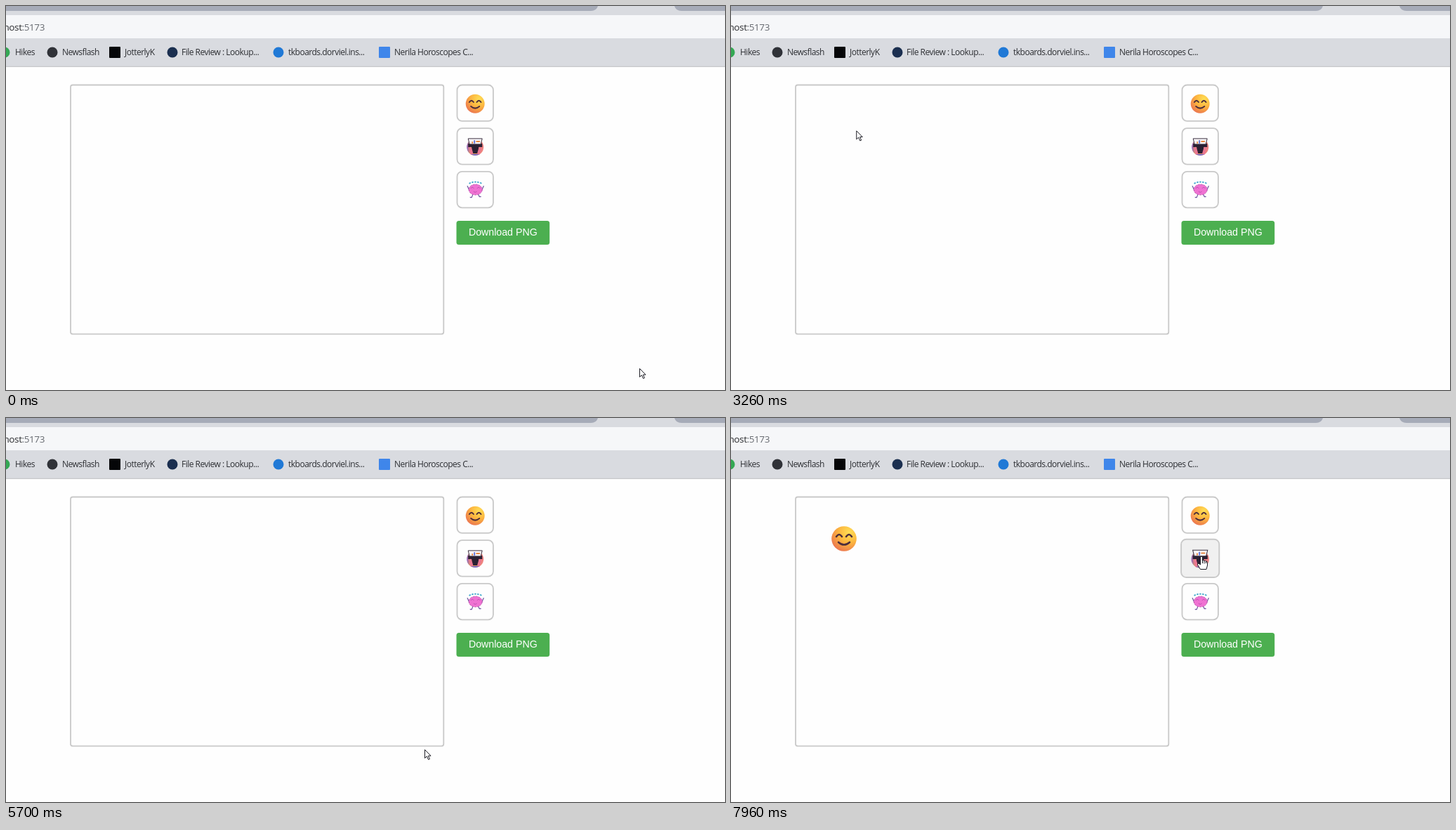
These frames come from a looping animation (1024 px wide and 547 px high, 8000 ms). An HTML page:

```html
<!DOCTYPE html>
<html lang="en">
<head>
<meta charset="utf-8">
<title>Sticker board</title>
<style>
html, body { margin: 0; height: 100%; overflow: hidden; background: #fefefe; }
svg { display: block; width: 100vw; height: 100vh; }
.mark { font: 12px "Open Sans", sans-serif; letter-spacing: -.5px; fill: #2d2f33; }
.url { font: 13.5px "Open Sans", sans-serif; letter-spacing: -.4px; fill: #2a2b2e; text-anchor: end; }
.label { font: 14.2px "Liberation Sans", Arial, sans-serif; fill: #fff; text-anchor: middle; }
.frame { fill: #fefefe; stroke: #c9c9c9; stroke-width: 1.8; }
.hover .frame { fill: #f0f0f0; }
.sel { fill: #2c64d3; display: none; }
.tint { opacity: .84; }
.selected .sel { display: inline; }
.line { fill: none; stroke-linecap: round; }
.pointer { fill: #fff; stroke: #1c1c24; stroke-linejoin: round; }
#press { fill: #ffff70; mix-blend-mode: multiply; }
</style>
</head>
<body>
<svg viewBox="0 0 1024 547" preserveAspectRatio="none">
  <defs>
    <radialGradient id="skin" cx=".7" cy=".25" r=".85">
      <stop offset="0" stop-color="#ffdf55"/>
      <stop offset=".5" stop-color="#fcb53f"/>
      <stop offset="1" stop-color="#ea7150"/>
    </radialGradient>
    <linearGradient id="glow">
      <stop offset="0" stop-color="#8d5cc4"/>
      <stop offset=".25" stop-color="#f0a94c"/>
      <stop offset="1" stop-color="#ee7f86"/>
    </linearGradient>
    <g id="smile">
      <circle r="17.8" fill="url(#skin)"/>
      <path class="line" stroke="#4d2e3c" stroke-width="2.6" d="M-11-3q4-6 8 0M3-3q4-6 8 0M-8 5q8 7 16 0"/>
    </g>
    <g id="desk">
      <circle cy="1" r="12" fill="url(#glow)"/>
      <path fill="#2b2033" d="M-10-4H10V1H5V10H-5V1H-10z"/>
      <path class="line" stroke="#ea7791" stroke-width="4" d="M-7 3L-5 10M7 3L5 10"/>
      <path fill="#6b62c9" d="M-6 11q6 4 12 0z"/>
      <path fill="#fbf7fa" stroke="#3a3040" d="M-10-11H10L8-3H-8z"/>
      <path class="line" stroke="#e98a45" stroke-width="2" d="M-4-5v-1M2-7h4"/>
      <path class="line" stroke="#6574d8" stroke-width="2" d="M-1-5v-3"/>
    </g>
    <g id="brain">
      <path class="line" stroke="#6d559f" stroke-width="1.2" d="M-8 2L-11-5M9 2L12-5M-3 6L-5 11h-2M4 6L6 10h2"/>
      <ellipse cx=".5" rx="9.500" ry="7.500" fill="#ef72d2" stroke="#c65bb5" stroke-dasharray="3 1"/>
      <path class="line" stroke="#c052b4" d="M-6-2q2-3 4 0M3-2q2-3 4 0M-2 3q2 2 4 0"/>
      <path class="line" stroke="#3aa6cb" stroke-width="1.800" stroke-dasharray="1 3" d="M-8-9q8-4 17 0"/>
    </g>
  </defs>

  <!-- browser bars -->
  <path fill="#d9dbe0" d="M0 0H1024V86H0z"/>
  <path fill="#a6abb8" d="M0 0H843Q841 7 833 7H0zM952 0H1024V7H962Q954 7 952 0z"/>
  <path fill="#f6f7f9" d="M0 13H1024V46H0z"/>
  <path stroke="#bcbdc0" d="M0 86.300H1024"/>
  <text class="url" x="55" y="35">host<tspan fill="#666a70">:5173</tspan></text>
  <g id="marks"></g>

  <!-- board and tools -->
  <rect class="frame" x="92" y="112.500" width="531.300" height="354.800" rx="3"/>
  <use id="placed" href="#smile" x="161" y="172"/>
  <g id="tools"></g>
  <rect id="save" x="641.500" y="306" width="132.700" height="34" rx="3.500"/>
  <text class="label" x="707.800" y="327">Download PNG</text>

  <!-- pointer -->
  <g id="cursor">
    <path id="arrow" class="pointer" d="M.5.500V12.500L3.400 9.800 5.500 14.600 7.400 13.800 5.400 9.200H9z"/>
    <path id="hand" class="pointer" d="M-1.500 1Q0-1 1.500 1V6Q3 5 4 6.500Q5.500 5.500 6.500 7Q8.500 6.500 8.500 9V13L7 18.500H-1.500L-5.500 12Q-6 9.500-3.500 10.500L-1.500 12zM1.500 6v4M4 6.500v4M6.500 7v3"/>
    <circle id="press" r="12"/>
  </g>
</svg>
<script>
const $ = id => document.getElementById(id);
const LOOP = 8000, STEP = 70;
const TOOL_X = 668.2, TOOL_Y = 138.2, TOOL_GAP = 61.7, TOOL_HALF = 25.7;

const disc = (x, color) => `<circle cx="${x}" cy="66" r="7.5" fill="${color}"/>`;
const tile = (x, color) => `<rect x="${x - 8}" y="58" width="16" height="16" rx="1" fill="${color}"/>`;
const mark = (x, icon, name) => `${icon}<text class="mark" x="${x}" y="70">${name}</text>`;
$("marks").innerHTML =
  mark(13, disc(-2, "#34a853"), "Hikes") +
  mark(80, disc(66, "#303238"), "Newsflash") +
  mark(169, tile(155, "#050608"), "JotterlyK") +
  mark(250, disc(237, "#1b2f50"), "File Review : Lookup...") +
  mark(402, disc(388, "#2079d6"), "tkboards.dorviel.ins...") +
  mark(553, tile(539, "#3f86ea"), "Nerila Horoscopes C...");

const box = (cls, x, y, w, h, rx = 0) =>
  `<rect class="${cls}" x="${x}" y="${y}" width="${w}" height="${h}" rx="${rx}"/>`;
const frame = box("frame", -TOOL_HALF, -TOOL_HALF, 2 * TOOL_HALF, 2 * TOOL_HALF, 7);
const tint = box("sel tint", -13.5, -13.5, 27, 27);
$("tools").innerHTML = [
  box("sel", -18, -18, 43, 35) + `<use href="#smile" transform="translate(0 1) scale(.755)"/>`,
  `<use href="#desk"/>` + tint,
  `<use href="#brain"/>` + tint
].map(art => `<g>${frame}${art}</g>`).join("");
const tools = [...$("tools").children];

// turning points of the pointer: time, x, y
const path = [
  [70, 902, 516], [560, 367, 97], [770, 536, 186], [1650, 169, 200], [1960, 540, 110],
  [2240, 415, 419], [2520, 220, 330], [2870, 563, 300], [3330, 109, 151], [3920, 91, 108],
  [4130, 91, 108], [4200, 101, 124], [4900, 655, 447], [5390, 596, 472], [5810, 596, 472],
  [6090, 690, 322], [6440, 667, 129], [7180, 667, 129], [7630, 670, 197]
];

const slope = (i, k) => path[i] && path[i + 1]
  ? (path[i + 1][k] - path[i][k]) / (path[i + 1][0] - path[i][0]) : 0;

// zero where the direction turns, so the curve never overshoots
function tangent(i, k) {
  const a = slope(i - 1, k), b = slope(i, k);
  return a * b > 0 ? 2 * a * b / (a + b) : 0;
}

function along(t, k) {
  const next = path.findIndex(p => p[0] > t);
  if (next < 0) return path.at(-1)[k];
  if (next === 0) return path[0][k];
  const p = path[next - 1], q = path[next];
  const h = q[0] - p[0], u = (t - p[0]) / h, v = 1 - u;
  return p[k] * v * v * (1 + 2 * u) + q[k] * u * u * (3 - 2 * u)
    + h * u * v * (tangent(next - 1, k) * v - tangent(next, k) * u);
}

const within = (v, a, b) => v >= a && v < b;
const show = (id, on) => $(id).style.display = on ? "inline" : "none";

function draw(t) {
  const x = along(t, 1), y = along(t, 2);
  const dragging = within(t, 4130, 5670);
  const saving = !dragging && within(x, 642, 774) && within(y, 306, 340);
  let hot = saving;
  tools.forEach((tool, i) => {
    const cy = TOOL_Y + i * TOOL_GAP;
    const over = !dragging && Math.max(Math.abs(x - TOOL_X), Math.abs(y - cy)) < TOOL_HALF;
    tool.setAttribute("transform", `translate(${TOOL_X} ${cy}) scale(${over ? 1.055 : 1})`);
    tool.classList.toggle("hover", over);
    hot ||= over;
  });
  $("save").setAttribute("fill", saving ? "#45a049" : "#4caf50");
  $("tools").classList.toggle("selected", within(t, 4800, 5250));
  show("placed", t >= 7110);
  show("arrow", !hot);
  show("hand", hot);
  show("press", dragging || within(t, 6970, 7110));
  $("cursor").setAttribute("transform", `translate(${x} ${y})`);
}

function tick() {
  const t = performance.now() % LOOP;
  draw(Math.floor((t + 20) / STEP) * STEP);
  requestAnimationFrame(tick);
}
tick();
</script>
</body>
</html>
```
